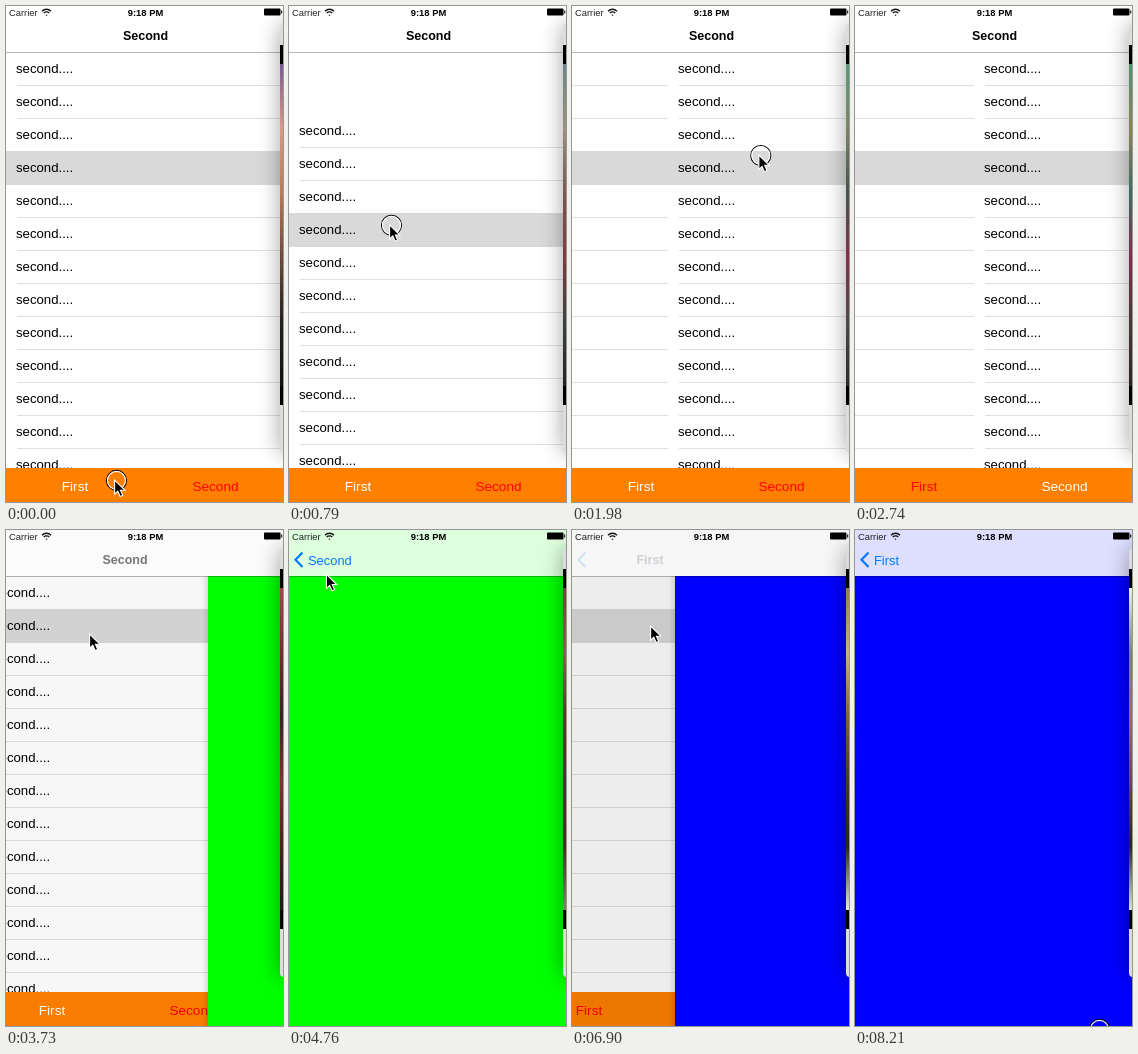
An HTML page that plays this animation: 277x496 px, repeating every 8.23 s.

```html
<!DOCTYPE html>
<html lang="en">
<head>
<meta charset="utf-8">
<title>Tabs and push navigation</title>
<style>
  html, body { margin: 0; width: 100%; height: 100%; overflow: hidden; background: #fff; }
  svg { display: block; width: 100vw; height: 100vh; }
  text { font-family: "Liberation Sans", Arial, sans-serif; white-space: pre; }
  .row { font-size: 13.2px; }
  .tab { font-size: 13.6px; text-anchor: middle; }
  .title { font-size: 12.5px; font-weight: bold; text-anchor: middle; }
  .back { font-size: 12.9px; fill: #007aff; }
  .status { font-size: 9.4px; }
</style>
</head>
<body>
<svg viewBox="0 0 277 496" preserveAspectRatio="none">
  <defs>
    <linearGradient id="edge"><stop stop-opacity="0"/><stop offset="1" stop-opacity=".12"/></linearGradient>
    <linearGradient id="photo" x2="0" y2="1"></linearGradient>
    <filter id="soft" x="-3" y="-.3" width="7" height="1.6"><feGaussianBlur stdDeviation="11"/></filter>
  </defs>
  <rect width="277" height="496" fill="#fff"/>

  <g id="home">
    <g id="pageFirst"></g>
    <g id="pageSecond"></g>
    <rect y="462" width="277" height="34" fill="#ff8000"/>
    <text id="tabFirst" class="tab" x="69" y="485">First</text>
    <text id="tabSecond" class="tab" x="209.5" y="485">Second</text>
    <rect id="dim" y="46" width="277" height="450"/>
  </g>

  <g id="detail">
    <rect x="-6" y="46" width="6" height="450" fill="url(#edge)"/>
    <rect id="detailFill" y="46" width="277" height="450"/>
  </g>

  <rect id="nav" width="277" height="46"/>
  <rect y="46" width="277" height="1" opacity=".28"/>
  <text id="title" class="title" y="34"></text>
  <path id="chevron" d="M13.5 22.6 6.5 29.8l7 7.2" fill="none" stroke="#007aff" stroke-width="2.2"/>
  <text id="back" class="back" y="34.6"></text>

  <text class="status" x="3" y="9.5" fill="#222">Carrier</text>
  <g fill="none" stroke="#111" stroke-width="1.3">
    <path d="M36 5.2a6.2 6.2 0 0 1 9 0M37.7 7.1a3.9 3.9 0 0 1 5.6 0"/>
    <path d="M39.5 8.9 40.5 10l1-1.1a1.4 1.4 0 0 0-2 0z" fill="#111" stroke="none"/>
  </g>
  <text class="status" x="139.5" y="9.5" font-weight="bold" text-anchor="middle">9:18 PM</text>
  <path d="M259 2.5h14.5a1 1 0 0 1 1 1v5a1 1 0 0 1-1 1H259a1 1 0 0 1-1-1v-5a1 1 0 0 1 1-1zM275.2 4.6h1v2.8h-1z"/>

  <rect x="274" y="18" width="60" height="429" rx="5" opacity=".36" filter="url(#soft)"/>
  <rect x="274" y="18" width="60" height="429" rx="4" fill="#dcdcdc"/>
  <rect x="274" y="39" width="3" height="360"/>
  <rect x="274" y="58" width="3" height="322" fill="url(#photo)"/>

  <g id="cursor">
    <g id="press" fill="none" stroke-width="1.1">
      <circle cx="2.5" cy="1.4" r="10" stroke="#000"/>
      <circle cx="2.5" cy="1.4" r="9" stroke="#fff"/>
    </g>
    <path d="M.6 1v14.2l3.2-3 2.3 5.3 2.6-1.1-2.3-5.2h4.5z" stroke="#fff" stroke-width="1.1"/>
  </g>
</svg>

<script>
const LOOP = 8230, WIDTH = 277, ROW = 33, TOP = 46;
const $ = id => document.getElementById(id);
const set = (id, attrs) => {
  for (const key in attrs) $(id).setAttribute(key, attrs[key]);
};
const mix = (a, b, k) => a + (b - a) * k;
const smooth = k => k * k * (3 - 2 * k);

// Keys are [time, ...values]
function track(t, keys, ease = smooth) {
  let i = 0;
  while (i < keys.length - 2 && t >= keys[i + 1][0]) i++;
  const [a, b] = [keys[i], keys[i + 1]];
  const k = Math.min(1, Math.max(0, (t - a[0]) / (b[0] - a[0])));
  return a.slice(1).map((v, j) => mix(v, b[j + 1], ease(k)));
}

const CURSOR = [
  [60, 108, 473], [380, 100, 94], [420, 100, 94], [800, 100, 218], [1400, 96, 108],
  [1720, 60, 140], [2080, 215, 150], [2500, 150, 185], [2735, -16, 190], [3200, -16, 150],
  [3570, 83, 103], [4300, 83, 103], [4950, 25, 28], [5300, 25, 28], [5720, 30, 145],
  [5890, 30, 145], [6130, 185, 152], [6640, 78, 95], [7080, 78, 95], [7540, 216, 66],
  [8130, 242, 498]
];
const PRESSED = [[0, 60], [420, 1250], [1730, 2070], [2510, 2720], [3590, 3655],
  [5200, 5280], [5900, 6120], [6685, 6749], [8150, LOOP]];
const SCROLL = [[420, 0], [800, 62], [1562, 0]];
const PAGE = [[1740, 1], [2350, 0], [2511, 0], [2931, 1], [5900, 1], [6400, 0]];
const PUSH_GREEN = 3658, POP = 5280, PUSH_BLUE = 6749;

const PHOTO = [
  [0, "#7d5a94 #d69a86 #b87a5c #6d4a3c #22201f #111111"],
  [1400, "#58a87c #6f8a70 #4a3f38 #8c3044 #4e5a58 #2a3030"],
  [2740, "#4c9470 #8c8450 #3c6c64 #842c50 #4a3834 #2c2422"],
  [3730, "#a84050 #742c38 #3a2024 #80303c #4a2024 #20181a"],
  [5740, "#5c3a20 #b88a58 #7a4c28 #32261c #4a3820 #dcecac"],
  [6900, "#9c7a4a #d0b080 #8a6038 #4a3824 #2a241c #e4ecd8"],
  [8210, "#e8f4e4 #7c8478 #98704c #6c4c38 #28241e #d8e8d0"]
].map(([time, colors]) => [time, ...colors.split(" ").flatMap(rgb)]);

function rgb(hex) {
  return [1, 3, 5].map(i => parseInt(hex.slice(i, i + 2), 16));
}
const css = c => `rgb(${c.map(Math.round)})`;

function spring(ms) {
  const x = ms * 0.014;
  return x <= 0 ? 0 : x > 7.5 ? 1 : 1 - (1 + x) * Math.exp(-x);
}

function pushProgress(t) {
  if (t < POP) return spring(t - PUSH_GREEN);
  if (t < PUSH_BLUE) return 1 - spring(t - POP);
  return spring(t - PUSH_BLUE);
}

function buildPage(name, label) {
  let lines = "", labels = "";
  for (let i = 0; i < 14; i++) {
    const y = TOP + i * ROW;
    lines += `<rect x="11" y="${y + ROW}" width="${WIDTH - 11}" height="1" fill="#e0e0e0"/>`;
    labels += `<text class="row" x="10" y="${y + 21}">${label}</text>`;
  }
  $("page" + name).innerHTML = `<rect y="${TOP}" width="${WIDTH}" height="450" fill="#fff"/>
    <g id="rows${name}">${lines}
      <rect id="picked${name}" width="${WIDTH}" height="${ROW + 1}" fill="#d9d9d9"/>${labels}</g>`;
}

function drawLists(t, push) {
  const [page] = track(t, PAGE);
  const [scroll] = track(t, SCROLL);
  const shift = Math.round(page * WIDTH);
  const secondTab = t < 2340 || (t >= 2900 && t < 6380);
  const pick = row => TOP + row * ROW;

  set("home", { transform: `translate(${Math.round(-0.3 * push * WIDTH)} 0)` });
  set("pageFirst", { transform: `translate(${-shift} 0)` });
  set("pageSecond", { transform: `translate(${WIDTH - shift} 0)` });
  set("rowsSecond", { transform: `translate(0 ${Math.round(scroll)})` });
  set("pickedSecond", { y: pick(t < 3600 ? 3 : 1) });
  set("pickedFirst", { y: pick(t < 6690 ? 3 : 1) });
  set("tabFirst", { fill: secondTab ? "#fff" : "#f00" });
  set("tabSecond", { fill: secondTab ? "#f00" : "#fff" });
  set("dim", { opacity: 0.11 * push });
  return page > 0.5 ? "Second" : "First";
}

function drawNav(push, name, green) {
  const center = name === "First" ? 32 : 42;
  const x = mix(139.5, center, push ** 1.2);
  const tint = green ? [222, 255, 222] : [222, 222, 255];
  const k = push ** 8;

  set("nav", { fill: css(tint.map(c => mix(mix(255, 247, Math.min(1, push * 2)), c, k))) });
  $("title").textContent = $("back").textContent = name;
  set("title", { x, opacity: (1 - push) ** 2 });
  set("back", { x: x - center + 19, opacity: push ** 7 });
  set("chevron", { opacity: push ** 4 });
}

function draw(t) {
  const push = pushProgress(t);
  const green = t < 5900;
  const name = drawLists(t, push);
  drawNav(push, name, green);
  set("detail", {
    transform: `translate(${Math.round(WIDTH * (1 - push))} 0)`,
    visibility: push > 0 ? "visible" : "hidden"
  });
  set("detailFill", { fill: green ? "#0f0" : "#00f" });

  const tones = track(t, PHOTO, k => k);
  [...$("photo").children].forEach((stop, i) =>
    stop.setAttribute("stop-color", css(tones.slice(i * 3, i * 3 + 3))));

  set("cursor", { transform: `translate(${track(t, CURSOR)})` });
  const down = PRESSED.some(([from, to]) => t >= from && t < to);
  set("press", { visibility: down ? "visible" : "hidden" });
}

buildPage("First", "first....");
buildPage("Second", "second....");
$("photo").innerHTML = [0, 1, 2, 3, 4, 5].map(i => `<stop offset="${i / 5}"/>`).join("");

const start = performance.now();
function frame() {
  draw((performance.now() - start) % LOOP);
  requestAnimationFrame(frame);
}
frame();
</script>
</body>
</html>
```
